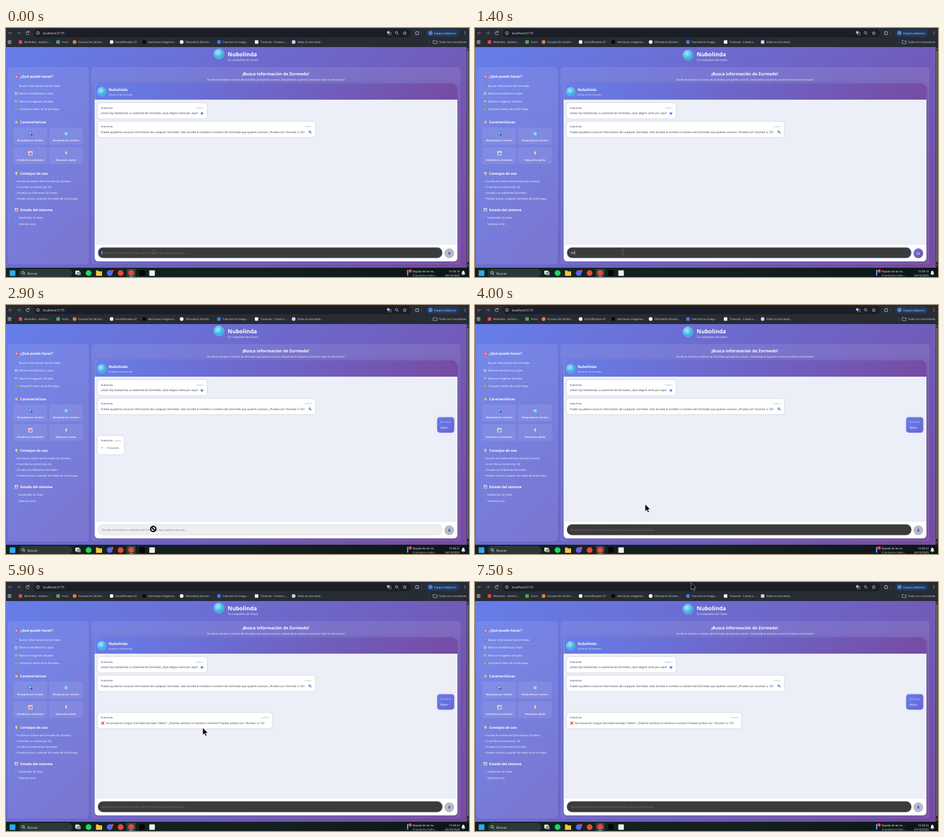
These frames come from a looping animation (800x431 px, 7600 ms). An HTML page:

```html
<!DOCTYPE html>
<html lang="es">
<head>
<meta charset="utf-8">
<title>Asistente de charla</title>
<style>
  html, body { margin: 0; width: 100%; height: 100%; overflow: hidden; background: #22252d; }
  svg { display: block; width: 100%; height: 100%; }
  text {
    font-family: "Open Sans", "Noto Sans", sans-serif;
    text-rendering: geometricPrecision;
    white-space: pre;
  }
  .b { font-weight: 700; }
  .s { font-weight: 600; }
  .bubble { filter: drop-shadow(0 .8px 1.5px rgba(30, 40, 80, .16)); }
</style>
</head>
<body>
<svg id="stage" viewBox="0 0 800 431" preserveAspectRatio="none"></svg>
<script>
const LOOP = 7600, STEP = 100;
const BOT = "Nubolinda", PET = "Zormedo", PETDEX = "Zormapa", SAMPLE = "tilumeo", QUERY = "Nilero";
const PROMPT = `Escribe el nombre o número del ${PET} que quieres buscar...`;

// Markup helpers
const text = (x, y, size, str, fill = "#fff", more = "") =>
  `<text x="${x}" y="${y}" font-size="${size}" fill="${fill}" ${more}>${str}</text>`;
const rect = (x, y, w, h, fill, r = 0, more = "") =>
  `<rect x="${x}" y="${y}" width="${w}" height="${h}" rx="${r}" fill="${fill}" ${more}/>`;
const dot = (x, y, r, fill, more = "") =>
  `<circle cx="${x}" cy="${y}" r="${r}" fill="${fill}" ${more}/>`;
const line = (d, stroke, w = 1, more = "") =>
  `<path d="${d}" fill="none" stroke="${stroke}" stroke-width="${w}" ${more}/>`;
const shape = (d, fill, more = "") => `<path d="${d}" fill="${fill}" ${more}/>`;
const group = (id, body, more = "") => `<g id="${id}" ${more}>${body}</g>`;
const MID = 'text-anchor="middle"', END = 'text-anchor="end"';

// Diagonal gradient matching CSS 135deg over a box
function diagonal(id, x, y, w, h, from, to) {
  const k = (w + h) / 4, cx = x + w / 2, cy = y + h / 2;
  return `<linearGradient id="${id}" gradientUnits="userSpaceOnUse" x1="${cx - k}" y1="${cy - k}" x2="${cx + k}" y2="${cy + k}">
    <stop stop-color="${from}"/><stop offset="1" stop-color="${to}"/></linearGradient>`;
}

// Small pictograms drawn in a box from -4 to 4
const ICONS = {
  lens: line("M.8 .8L3.2 3.2", "#2b3a67", 1.5) + dot(-.8, -.8, 2.4, "#7fd0ff", 'stroke="#2f6fd0" stroke-width="1"'),
  chart: rect(-3.6, -3.6, 7.2, 7.2, "#e9eef5", .6) + rect(-2.6, -.5, 1.4, 3.3, "#3fb95f") +
    rect(-.7, -2.6, 1.4, 5.4, "#e0483e") + rect(1.2, -1.4, 1.4, 4.2, "#3a86e0"),
  picture: rect(-3.6, -3, 7.2, 6, "#e8c46a", .5) + rect(-2.8, -2.2, 5.6, 4.4, "#74c7ee") +
    shape("M-2.8 2.2L-.6 -.6L.8 .8L1.6 0L2.8 2.2Z", "#4aa657"),
  swap: rect(-3.4, -3, 6.8, 6, "#5fa84e", .7) + rect(-2, -1.6, 3, 3, "#f2d56a", .5),
  target: dot(0, 0, 3.5, "#e0384a") + dot(0, 0, 2.2, "#fff") + dot(0, 0, 1.1, "#e0384a"),
  star: shape("M0 -3.8L1.2 -1.2L3.8 -1L1.8 .8L2.4 3.6L0 2.1L-2.4 3.6L-1.8 .8L-3.8 -1L-1.2 -1.2Z", "#ffc93c"),
  bulb: dot(0, -1, 2.6, "#ffd54a") + rect(-1.1, 1.3, 2.2, 2.2, "#c9cdd8", .5),
  numbers: rect(-3.2, -3.6, 6.4, 7.2, "#4da3e8", .8) +
    line("M-1.3 -2.5V2.5M1.3 -2.5V2.5M-2.4 -1H2.4M-2.4 1.2H2.4", "#e8f4ff", .8),
  rocket: shape("M0 -4C1.8 -2 1.7 .5 1.2 2H-1.2C-1.7 .5 -1.8 -2 0 -4Z", "#d9dce8") +
    shape("M-1.2 .4L-2.6 3L-1 2.1ZM1.2 .4L2.6 3L1 2.1Z", "#e0463c") + shape("M-.8 2.2H.8L0 4Z", "#ffb02e"),
  heart: shape("M0 3.4C-6 -.4 -3.2 -5 0 -2C3.2 -5 6 -.4 0 3.4Z", "#3d86f0"),
  cross: line("M-2.7 -2.7L2.7 2.7M2.7 -2.7L-2.7 2.7", "#dd2e44", 1.7, 'stroke-linecap="round"')
};
const icon = (name, x, y, k = 1) => `<g transform="translate(${x} ${y}) scale(${k})">${ICONS[name]}</g>`;

function browser() {
  const ink = "#c9ced8", dim = "#777d89";
  let s = rect(0, 0, 800, 33, "#272b34") + rect(48, 1.5, 652, 14.5, "#1b1e26", 7.2);
  s += line("M10.5 8.7H4.5M7.2 6L4.5 8.7L7.2 11.4", dim, .9) + line("M19 8.7H25M22.3 6L25 8.7L22.3 11.4", dim, .9);
  s += line("M39.4 7A2.7 2.7 0 1 0 40 9.6M39.9 5V7.4H37.5", ink, .9);
  s += dot(55.2, 8.7, 2.6, "none", `stroke="${ink}" stroke-width=".8"`) + line("M55.2 8.3V10.2M55.2 7V7.6", ink, .7);
  s += text(63.7, 10.8, 5.5, "localhost:5175", "#e5e8ee");
  s += rect(658.5, 5.5, 4, 4.6, "#a9b4c6", .5) + rect(661.3, 7.5, 4, 4.4, "none", .5, `stroke="${ink}" stroke-width=".6"`);
  s += dot(674.6, 8, 2, "none", `stroke="${ink}" stroke-width=".8"`) + line("M676 9.5L678 11.5", ink, .9);
  s += `<g transform="translate(689 8.7) scale(.75)">${shape("M0 -3.8L1.2 -1.2L3.8 -1L1.8 .8L2.4 3.6L0 2.1L-2.4 3.6L-1.8 .8L-3.8 -1L-1.2 -1.2Z", "none", `stroke="${ink}" stroke-width="1"`)}</g>`;
  s += rect(707.8, 6.4, 5, 5, "none", .7, `stroke="${ink}" stroke-width=".9"`) + line("M718.5 5V12.5", "#565c68", .5);
  s += rect(726, 2.2, 57, 13, "#20395f", 6.5) + dot(733.5, 8.7, 3.6, "#5b7fbd") + text(740, 10.5, 4.7, "Espacio didáctico", "#cfe0ff");
  for (const y of [6.3, 8.7, 11.1]) s += dot(793, y, .65, ink);

  for (const x of [3.4, 6.6]) for (const y of [21.7, 24.9]) s += rect(x, y, 2.2, 2.2, "none", 0, `stroke="${ink}" stroke-width=".6"`);
  const marks = [
    [25, "#e04a3f", 0, "Recibidos - daniel.r..."], [90, "#4bab58", 0, "Inicio"],
    [118.5, "#e2803c", 1, "Escuela De Cerámi..."], [182.5, "#f0f2f5", 1, "DanielRosales-47"],
    [239, "#08090b", 0, "Hermosas imágenes..."], [303.5, "#f0f2f5", 1, "DRosalesU (Daniel..."],
    [368, "#3a7be8", 0, "Free text-to-image..."], [433, "#f0f2f5", 0, "TrazaLab - Create a..."],
    [497, "#c7d3e6", 1, "Video to animated..."]
  ];
  for (const [x, fill, round, label] of marks)
    s += (round ? dot(x, 24.2, 3.2, fill) : rect(x - 3, 21.2, 6, 6, fill, .6)) + text(x + 6.4, 26, 4.7, label, "#d4d8e0");
  s += line("M732 20V28.5", "#565c68", .5) + shape("M738 21.7H740.6L741.4 22.6H744.8V27H738Z", "none", `stroke="${ink}" stroke-width=".7"`);
  return s + text(747.8, 26, 4.7, "Todos los marcadores", "#d4d8e0");
}

function sidebar() {
  const glass = "rgba(255,255,255,.08)";
  let s = rect(3.2, 68.2, 139.4, 340.6, "rgba(255,255,255,.09)", 5, 'stroke="rgba(255,255,255,.13)" stroke-width=".5"');
  const heads = [["target", 86.4, "¿Qué puedo hacer?"], ["star", 165, "Características"],
    ["bulb", 254, "Consejos de uso"], ["chart", 316.7, "Estado del sistema"]];
  for (const [pic, y, label] of heads) s += icon(pic, 18, y - 2.1, .8) + text(24.6, y, 6, label, "#fff", 'class="b"');

  const items = [["lens", `Buscar información de ${PET}`], ["chart", "Mostrar estadísticas y tipos"],
    ["picture", "Mostrar imágenes oficiales"], ["swap", `Compartir datos de la ${PETDEX}`]];
  items.forEach(([pic, label], i) => {
    const y = 101.9 + i * 13.45;
    s += icon(pic, 17.6, y - 1.7, .6) + text(22.4, y, 4.75, label);
    if (i < 3) s += rect(14, y + 4.8, 118, .45, "rgba(255,255,255,.12)");
  });

  const cards = [["lens", "Búsqueda por nombre"], ["numbers", "Búsqueda por número"],
    ["chart", "Estadísticas completas"], ["rocket", "Respuesta rápida"]];
  cards.forEach(([pic, label], i) => {
    const x = 13 + (i % 2) * 61.7, y = 172.3 + (i >> 1) * 33.8;
    s += rect(x, y, 58, 29.4, glass, 3) + icon(pic, x + 29.2, y + 10.7, 1) +
      text(x + 29, y + 23.8, 4.2, label, "#fff", MID + ' class="s"');
  });

  const tips = [`Escribe el nombre del ${PET} (ej: ${SAMPLE})`, "O escribe su número (ej: 25)",
    `¡Prueba con diferentes ${PET}!`, `Puedes buscar cualquier ${PET} de la ${PETDEX}`];
  tips.forEach((tip, i) => s += text(16.2, 267 + i * 9.95, 4.55, "• " + tip));
  s += dot(16, 327.8, 1, "#4ade80", 'id="led1"') + text(21.2, 329.6, 4.7, BOT + ": En línea");
  return s + dot(16, 338.6, 1, "#4aa3f5", 'id="led2"') + text(21.2, 340.5, 4.7, "Sistema: Listo");
}

const card = (x, y, w, h, fill = "#fff") => rect(x, y, w, h, fill, 4.5, 'class="bubble"');

function botMessage(y, w, time, body) {
  return card(158.6, y, w, 26.6) + text(164, y + 9.7, 4.1, BOT, "#666b76", 'class="s"') +
    text(158.6 + w - 5.4, y + 9.6, 3.5, time, "#8a8f99", END) + body;
}

function chat() {
  let s = rect(148.2, 68.2, 636.6, 340.6, "rgba(255,255,255,.09)", 5, 'stroke="rgba(255,255,255,.13)" stroke-width=".5"');
  s += text(466, 81.6, 7.2, `¡Busca información de ${PET}!`, "#fff", MID + ' class="b"');
  s += text(466.5, 91.3, 4.3, `Escribe el nombre o número del ${PET} que quieres conocer. ¡${BOT} te ayudará a encontrar toda la información!`, "#fff", MID);
  s += rect(153.3, 96, 626.7, 308, "#fff", 6, 'style="filter:drop-shadow(0 2px 4px rgba(30,20,80,.25))"');
  s += shape("M153.3 124.3V102A6 6 0 0 1 159.3 96H774A6 6 0 0 1 780 102V124.3Z", "url(#head)");
  s += dot(165.4, 110.2, 7.6, "url(#ball)", 'stroke="rgba(255,255,255,.4)" stroke-width=".6"');
  s += text(177.2, 108.9, 6.3, BOT, "#fff", 'class="b"') + text(177.2, 117, 4.05, "Asistente de " + PET, "#eeeafd");
  s += rect(153.3, 124.3, 626.7, 250.7, "#eceff7") + rect(153.3, 374.6, 626.7, .5, "#dfe3ec");
  s += botMessage(130, 188.4, "19:38:11",
    text(164, 149.4, 4.8, `¡Hola! Soy ${BOT}, tu asistente de ${PET}. ¡Qué alegría verte por aquí!`, "#333842") + icon("heart", 338.6, 148, .66));
  s += botMessage(162.3, 375.4, "19:38:11",
    text(164, 181.8, 4.8, `Puedo ayudarte a buscar información de cualquier ${PET}. Solo escribe el nombre o número del ${PET} que quieres conocer. ¡Prueba con '${SAMPLE}' o '25'!`, "#333842") + icon("lens", 525.3, 180, .7));
  s += group("mine", card(745, 194.3, 29.5, 26.6, "url(#own)") +
    text(750.4, 204.2, 3.5, '<tspan font-weight="600">Tú</tspan> 19:38:20', "#e6e6ff") + text(750.4, 213.8, 4.9, QUERY));
  s += group("wait", card(158.6, 226.4, 45.2, 32.2) + text(164, 236.3, 4.1, BOT, "#666b76", 'class="s"') +
    text(198.4, 236.2, 3.6, "Ahora", "#8a8f99", END) +
    [0, 1, 2].map(i => dot(165.2 + i * 2.9, 247, .95, "#667eea", `id="think${i}"`)).join("") +
    text(174.8, 248.8, 4.5, "Pensando...", "#555b66", 'font-style="italic"'));
  s += group("reply", botMessage(226.4, 301.2, "19:38:23", icon("cross", 167.2, 244.3, .78) +
    text(172.4, 246, 4.75, `No encuentro ningún ${PET} llamado "${QUERY}". ¿Podrías verificar el nombre o número? Puedes probar con "${SAMPLE}" o "25".`, "#333842")));

  s += rect(159.1, 380, 594.6, 18, "#3b3b3b", 8.5, 'id="field" stroke-width=".8"');
  s += text(165.6, 391.2, 5, PROMPT, "#777", 'id="hint"') + text(165.6, 391.2, 5, "", "#fff", 'id="typed"');
  s += rect(165.4, 385.8, .6, 6.6, "#fff", 0, 'id="caret"');
  s += group("sendOff", dot(766, 390, 8.4, "#b9bac4") + shape("M766 386.6C768 389 768 391 767 392.6H765C764 391 764 389 766 386.6Z", "#4765d6"));
  return s + group("sendOn", dot(766, 390, 8.4, "url(#send)") + line("M764.2 388V391.8H767.8V388", "#f2efff", .8));
}

function taskbar() {
  let s = rect(0, 415, 800, 16, "url(#bar)") + rect(6.4, 419.4, 9.8, 9.8, "#35a7ee", .6);
  s += rect(22.5, 417.5, 91.5, 13.2, "#2b3837", 6.6, 'stroke="#40504e" stroke-width=".4"');
  s += dot(29.5, 423.6, 2.1, "none", 'stroke="#e3eaea" stroke-width=".9"') + line("M31.1 425.2L33 427.1", "#e3eaea", .9);
  s += text(37, 426.6, 5.6, "Buscar", "#dfe5e5");
  s += rect(119.8, 420, 7, 6.4, "#f0f3f3", .5) + rect(122.4, 422, 6.6, 6, "#8f9a9a", .5);
  s += dot(142.7, 424.3, 5, "#1ed760") + shape("M155.5 419.8H159.4L160.6 421.2H166V429H155.5Z", "#f5c344");
  s += dot(179.2, 424.3, 5, "#5865f2") + dot(183.4, 420.8, 2.4, "#e23b3b") + dot(198, 424.3, 5, "#e5493a");
  s += rect(208.6, 416.8, 15.4, 14, "rgba(255,255,255,.14)", 2) + dot(216.3, 424, 5, "#e5493a") + rect(213.3, 430, 6, 1, "#77c4f2", .5);
  s += rect(230, 419.3, 9.8, 9.8, "#050606", 1.4) + rect(247.6, 419.4, 9.6, 9.6, "#eef0f2", 1);
  s += line("M694 419.5V427M694 427.6V427.8", "#4da3ff", 2.2, 'stroke-linecap="round"') + dot(698.4, 420.5, 3, "#d9363e");
  s += text(698.4, 422.1, 4.2, "1", "#fff", MID);
  s += text(703, 423.3, 4.8, "Bajada de las te...", "#f2f5f5") + text(703, 430, 4.8, "El próximo miérc...", "#c2caca");
  s += text(784, 423.3, 4.8, "", "#f2f5f5", END + ' id="clock"') + text(784, 430, 4.8, "24/10/2025", "#f2f5f5", END);
  return s + shape("M790.2 420.2C792.6 420.2 792.4 423 792.8 425L793.8 426.6H786.6L787.6 425C788 423 787.8 420.2 790.2 420.2ZM789 427.3H791.4L790.2 428.5Z", "#e8eeee");
}

const beam = "M-2 -4.2H-.5Q0 -4.2 0 -3.7Q0 -4.2 .5 -4.2H2M0 -3.7V3.7M-2 4.2H-.5Q0 4.2 0 3.7Q0 4.2 .5 4.2H2";
const pointer = shape("M0 0V12.2L2.8 9.6L4.9 14L6.9 13.1L4.9 8.8L8.7 8.6Z", "#050505", 'stroke="#fff" stroke-width=".5"');

const stage = document.getElementById("stage");
stage.innerHTML = `<defs>
  ${diagonal("page", 0, 33, 796, 382, "#667eea", "#764ba2")}
  ${diagonal("head", 153, 96, 627, 28, "#667eea", "#764ba2")}
  ${diagonal("own", 745, 194, 30, 27, "#667eea", "#6c63d4")}
  ${diagonal("send", 757, 381, 17, 17, "#667eea", "#764ba2")}
  <radialGradient id="ball" cx=".4" cy=".35"><stop stop-color="#a5ecfb"/><stop offset="1" stop-color="#3aaee0"/></radialGradient>
  <linearGradient id="bar"><stop stop-color="#0f231e"/><stop offset=".5" stop-color="#15211f"/><stop offset="1" stop-color="#0d1517"/></linearGradient>
</defs>` +
  rect(0, 33, 796, 382, "url(#page)") + rect(796, 33, 4, 382, "#2c2c2c") + rect(796.9, 39, 2.2, 366, "#737373", 1.1) +
  shape("M796.9 37L798 35L799.1 37ZM796.9 410L798 412L799.1 410Z", "#9a9a9a") +
  browser() +
  group("logo", dot(368, 0, 9, "url(#ball)", 'stroke="rgba(255,255,255,.35)" stroke-width=".6"')) +
  text(383, 49.2, 9.7, BOT, "#fff", 'class="b"') + text(383, 57.2, 4.55, "Tu Compañero de Charla") +
  sidebar() + chat() + taskbar() +
  group("mouse",
    group("ibeam", line(beam, "#b5b5b5", 1.7) + line(beam, "#000", 1)) +
    group("denied", dot(0, 0, 4.5, "#fff", 'stroke="#000" stroke-width="2.2"') + line("M-3.2 -3.2L3.2 3.2", "#000", 2.2)) +
    group("arrow", pointer));

const $ = id => document.getElementById(id);
const set = (id, attrs) => { for (const k in attrs) $(id).setAttribute(k, attrs[k]); };
const show = (id, on) => set(id, { visibility: on ? "visible" : "hidden" });

// Pointer path: time, x, y
const PATH = [[0, 255, 388], [3200, 254.4, 387.6], [3800, 294, 345], [4800, 294, 345],
  [5600, 340, 252.5], [6300, 340, 252.5], [7200, 373.3, 1.5], [7600, 373.3, 1.5]];
const KEYS = [1000, 1200, 1400, 1600, 1800, 2000];
const SENT = 2300, READY = 3800, REPLY = 4900;

const ease = u => u * u * (3 - 2 * u);
function pointerAt(t) {
  const i = PATH.findIndex((p, n) => n && t <= p[0]);
  const [t0, x0, y0] = PATH[i - 1], [t1, x1, y1] = PATH[i];
  const u = ease((t - t0) / (t1 - t0));
  return [x0 + (x1 - x0) * u, y0 + (y1 - y0) * u];
}
function enter(id, t, from) {
  const u = Math.min(1, Math.max(0, (t - from + STEP) / 400)), k = 1 - (1 - u) ** 2;
  set(id, { opacity: k, transform: `translate(0 ${4 * (1 - k)})` });
}

function draw(t) {
  const count = KEYS.filter(k => t >= k).length;
  const typing = count > 0 && t < SENT, busy = t >= SENT && t < READY;
  set("logo", { transform: `translate(0 ${46 - Math.cos(t * 2 * Math.PI / 3000)})` });
  const beat = Math.cos(t * Math.PI / 1000);
  set("led1", { opacity: .65 + .3 * beat });
  set("led2", { opacity: .6 + .35 * beat });
  $("clock").textContent = "19:38:" + (18 + Math.floor((t + 200) / 1000));

  enter("mine", t, SENT);
  enter("wait", t, SENT + 100);
  enter("reply", t, REPLY);
  show("wait", busy);
  for (let i = 0; i < 3; i++)
    set("think" + i, { opacity: .65 + .35 * Math.sin(t * 2 * Math.PI / 1400 - i * 1.2) });

  set("field", { fill: busy ? "#efeff0" : "#3b3b3b", stroke: t < SENT ? "#667eea" : busy ? "#d8dae0" : "#4a4a4c" });
  set("hint", { fill: busy ? "#74777c" : "#777" });
  show("hint", !typing);
  $("typed").textContent = typing ? QUERY.slice(0, count) : "";
  const w = typing ? $("typed").getComputedTextLength() : 0;
  set("caret", { x: 165.5 + w });
  show("caret", t < SENT && (typing || t % 1000 < 500));
  show("sendOn", typing);
  show("sendOff", !typing);

  const [x, y] = pointerAt(t), inField = y > 380;
  set("mouse", { transform: `translate(${x} ${y})` });
  show("ibeam", inField && !busy);
  show("denied", inField && busy);
  show("arrow", !inField);
}

const start = performance.now();
function tick() {
  const t = (performance.now() - start) % LOOP;
  draw(Math.floor(t / STEP) * STEP);
  requestAnimationFrame(tick);
}
tick();
</script>
</body>
</html>
```
